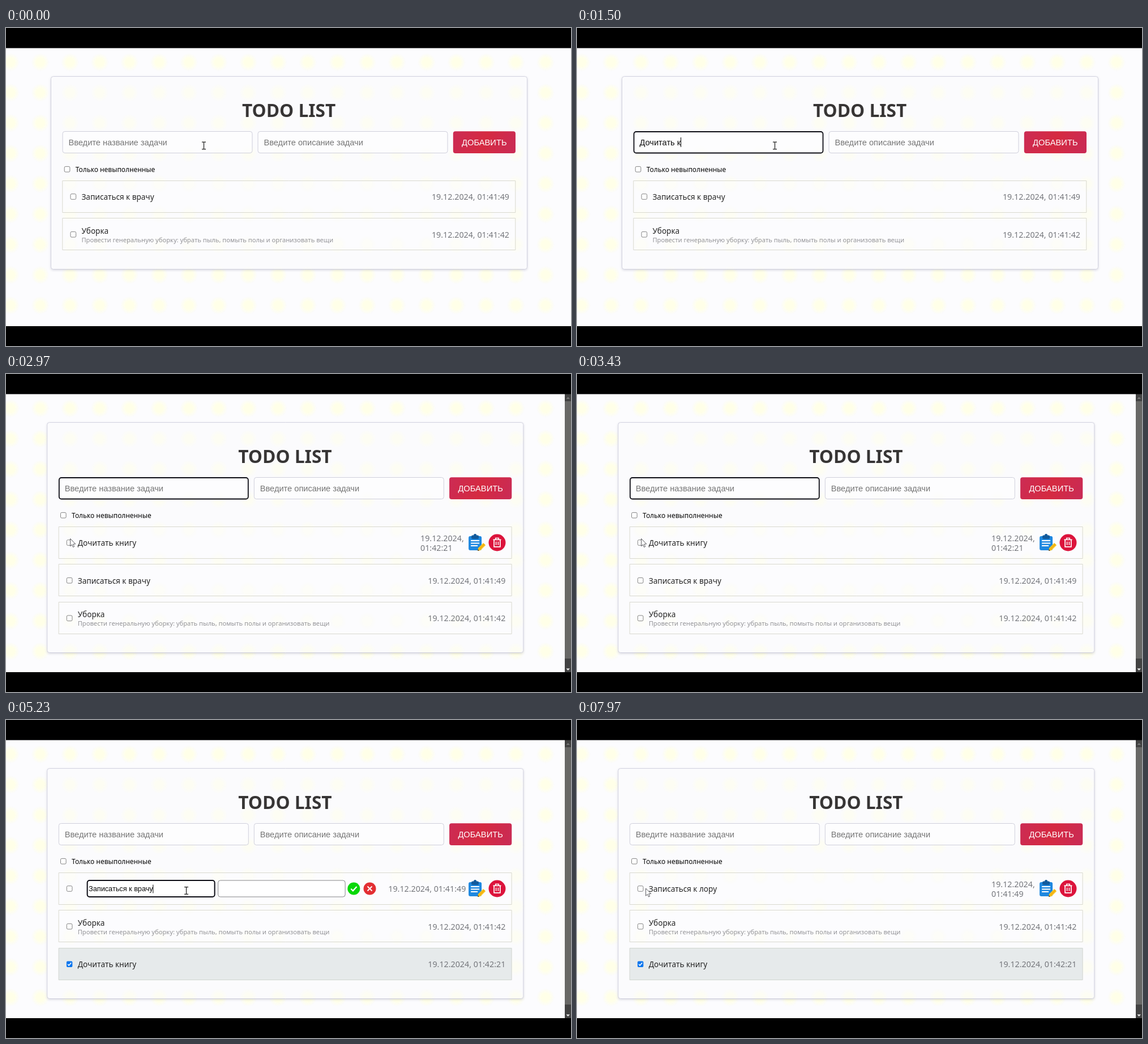
Write an HTML page with a canvas that moves like this. It is 998x561 px and loops after 8000 ms.

```html
<!DOCTYPE html>
<html lang="ru">
<head>
<meta charset="utf-8">
<title>Todo list</title>
<style>
html, body { margin: 0; width: 100%; height: 100%; overflow: hidden; background: #000; }
canvas { display: block; width: 100%; height: 100%; }
</style>
</head>
<body>
<canvas id="stage" width="998" height="561"></canvas>
<script>
const ctx = document.getElementById('stage').getContext('2d');
const LOOP = 8000;
const SANS = '"Noto Sans", sans-serif';
const ARIAL = '"Liberation Sans", Arial, sans-serif';

// Moments of the user's actions, in ms
const FOCUS = 180, SUBMIT = 2500, TICK = 3450, EDIT = 4500, REFOCUS = 5180, SAVE = 7250;
const TYPING = { start: 560, step: 100, text: 'Дочитать книгу' };
const ERASE = { start: 5300, step: 80 };
const RETYPE = { start: 5740, step: 120, text: 'лору' };
const ROWS = [297.5, 364.2, 430.8];

// Pointer legs: start, end, from, to
const LEGS = [
  [2540, 2930, [349.5, 207.5], [113.5, 290.5]],
  [3560, 4270, [113.5, 290.5], [827.5, 298.5]],
  [4640, 5120, [827.5, 298.5], [318.5, 301]],
  [6780, 7130, [318.5, 301], [614, 299]],
  [7340, 7880, [614, 299], [121.5, 297]]
];

const clamp = (v, lo, hi) => Math.max(lo, Math.min(hi, v));
const ease = p => p * p * (3 - 2 * p);

function keysHit(t, k, count) {
  return clamp(Math.floor((t - k.start) / k.step) + 1, 0, count);
}

function pointerAt(t) {
  let pos = LEGS[0][2];
  for (const [from, to, a, b] of LEGS) {
    if (t < from) break;
    const p = ease(clamp((t - from) / (to - from), 0, 1));
    pos = [a[0] + (b[0] - a[0]) * p, a[1] + (b[1] - a[1]) * p];
  }
  return pos;
}

function text(s, x, y, size, color, family = SANS, align = 'left') {
  ctx.font = size + 'px ' + family;
  ctx.fillStyle = color;
  ctx.textAlign = align;
  ctx.fillText(s, x, y);
}

function box(x, y, w, h, r, fill, stroke, line = 1) {
  ctx.beginPath();
  ctx.roundRect(x, y, w, h, r);
  if (fill) { ctx.fillStyle = fill; ctx.fill(); }
  if (stroke) { ctx.strokeStyle = stroke; ctx.lineWidth = line; ctx.stroke(); }
}

function disc(x, y, r, color) {
  ctx.beginPath();
  ctx.arc(x, y, r, 0, Math.PI * 2);
  ctx.fillStyle = color;
  ctx.fill();
}

function path(points, color, width) {
  ctx.beginPath();
  points.forEach(([x, y]) => ctx.lineTo(x, y));
  ctx.strokeStyle = color;
  ctx.lineWidth = width;
  ctx.stroke();
}

function polygon(points, color) {
  ctx.beginPath();
  points.forEach(([x, y]) => ctx.lineTo(x, y));
  ctx.closePath();
  ctx.fillStyle = color;
  ctx.fill();
}

function at(x, y, scale, draw) {
  ctx.save();
  ctx.translate(x, y);
  ctx.scale(scale, scale);
  draw();
  ctx.restore();
}

const dot = document.createElement('canvas');
dot.width = dot.height = 34;
{
  const c = dot.getContext('2d');
  const g = c.createRadialGradient(17, 17, 7, 17, 17, 16);
  g.addColorStop(0, 'rgba(255,255,232,1)');
  g.addColorStop(1, 'rgba(255,255,232,0)');
  c.fillStyle = g;
  c.fillRect(0, 0, 34, 34);
}

function drawPage() {
  ctx.fillStyle = '#fcfcfe';
  ctx.fillRect(0, 0, 998, 561);
  for (let row = 0; row < 9; row++)
    for (let col = 0; col < 19; col++)
      ctx.drawImage(dot, 8 + col * 52.5 - 17, 60.5 + row * 53.6 - 17);
}

function drawBars() {
  ctx.fillStyle = '#000';
  ctx.fillRect(0, 0, 998, 35.5);
  ctx.fillRect(0, 526, 998, 35);
}

function drawScrollbar() {
  ctx.fillStyle = '#424242';
  ctx.fillRect(987, 35, 11, 491);
  ctx.fillStyle = '#686866';
  ctx.fillRect(987, 48, 11, 454);
  polygon([[989.5, 44], [996, 44], [992.7, 40.5]], '#777');
  polygon([[989.5, 519.5], [996, 519.5], [992.7, 523]], '#eee');
}

function drawCard(height) {
  ctx.save();
  ctx.shadowColor = 'rgba(40,40,80,.2)';
  ctx.shadowBlur = 4;
  ctx.shadowOffsetY = 1.5;
  // Shadow only outside the see-through card
  ctx.beginPath();
  ctx.rect(0, 0, 998, 561);
  ctx.roundRect(79.5, 85.5, 841, height, 4);
  ctx.clip('evenodd');
  box(79.5, 85.5, 841, height, 4, '#fcfcfe');
  ctx.restore();
  box(79.5, 85.5, 841, height, 4, 'rgba(252,252,254,.55)', '#d3d3e0');
}

function checkbox(x, y, checked) {
  if (!checked) return box(x - 4.8, y - 4.8, 9.6, 9.6, 2, '#fff', '#767676', 0.9);
  box(x - 5.2, y - 5.2, 10.4, 10.4, 2, '#0b76ee');
  path([[x - 3, y], [x - 1, y + 2.3], [x + 3.1, y - 2.5]], '#fff', 1.5);
}

function caretShown(t, since) {
  return Math.floor((t - since) / 500) % 2 === 0;
}

function caret(x, y, h) {
  ctx.fillStyle = '#000';
  ctx.fillRect(Math.round(x), y, 1, h);
}

function field(x, value, hint, focused) {
  const fill = 'rgba(254,254,255,.7)';
  if (focused) box(x + 0.5, 183, 334, 37.5, 4, fill, '#0c0c14', 1.8);
  else box(x, 182.5, 335, 38, 4, fill, '#cfcfdb');
  text(value || hint, x + 10.5, 207, 14.6, value ? '#111' : '#757575', ARIAL);
}

function drawForm(t) {
  text('TODO LIST', 499.6, 157, 'bold 31.6', '#373535', SANS, 'center');
  const focused = t >= FOCUS && t < TICK;
  const count = keysHit(t, TYPING, TYPING.text.length);
  const value = t < SUBMIT ? TYPING.text.slice(0, count) : '';
  field(100, value, 'Введите название задачи', focused);
  if (focused && t < SUBMIT) {
    const last = count ? TYPING.start + (count - 1) * TYPING.step : FOCUS;
    ctx.font = '14.6px ' + ARIAL;
    if (caretShown(t, last)) caret(110.5 + ctx.measureText(value).width, 193, 17);
  }
  field(445, '', 'Введите описание задачи', false);

  const g = ctx.createLinearGradient(790, 182, 900, 221);
  g.addColorStop(0, '#cc2b54');
  g.addColorStop(0.5, '#d52a41');
  g.addColorStop(1, '#c92b56');
  box(789.8, 182.3, 110.2, 38.7, 4, g);
  text('ДОБАВИТЬ', 844.8, 207, 14.7, '#fff', ARIAL, 'center');

  checkbox(108, 249.2, false);
  text('Только невыполненные', 122.8, 254, 11.9, '#050505');
}

function editIcon(x, y, scale) {
  at(x, y, scale, () => {
    box(-15, -11.5, 23, 25, 3, '#1e88e0');
    box(-10, -13, 13, 6.5, 2, '#125a9c');
    disc(-3.5, -13, 2.6, '#125a9c');
    for (const [ly, w] of [[-3.5, 15], [1, 15], [5.5, 12]]) {
      ctx.fillStyle = '#fff';
      ctx.fillRect(-11, ly - 1, w, 2);
    }
    polygon([[1, 14.5], [2, 9.5], [11, 0.5], [15, 4.5], [6, 13.5]], '#fbc31c');
    path([[4, 11.5], [13, 2.5]], '#eda512', 1.2);
    polygon([[1, 14.5], [1.6, 11.6], [4, 13.9]], '#5a4630');
  });
}

function trashIcon(x, y) {
  at(x, y, 1, () => {
    disc(0, 0, 15, '#dc143c');
    path([[-7, -5.2], [7, -5.2]], '#fff', 1.7);
    path([[-2.8, -5.5], [-2.8, -8], [2.8, -8], [2.8, -5.5]], '#fff', 1.5);
    path([[-5.4, -5], [-5.4, 7.4], [5.4, 7.4], [5.4, -5]], '#fff', 1.7);
    path([[-1.9, -1.8], [-1.9, 4.3]], '#fff', 1.5);
    path([[1.9, -1.8], [1.9, 4.3]], '#fff', 1.5);
  });
}

function drawEditor(t, y) {
  const focused = t >= REFOCUS;
  const erased = keysHit(t, ERASE, 5);
  const typed = keysHit(t, RETYPE, 4);
  const value = 'Записаться к ' + 'врачу'.slice(0, 5 - erased) + RETYPE.text.slice(0, typed);
  box(150.3, y - 14.5, 225, 29, 4, '#fff', focused ? '#0c0c14' : '#858588', focused ? 2 : 1);
  box(381.3, y - 14.5, 224.5, 29, 4, '#fff', '#858588');
  text(value, 152.8, y + 4.6, 12.7, '#080808', ARIAL);
  if (focused) {
    const last = typed ? RETYPE.start + (typed - 1) * RETYPE.step
      : erased ? ERASE.start + (erased - 1) * ERASE.step : REFOCUS;
    if (caretShown(t, last)) caret(152.8 + ctx.measureText(value).width, y - 7, 15);
  }
  disc(621, y, 11, '#08d808');
  path([[616, y + 0.3], [619.6, y + 3.8], [626.2, y - 3.4]], '#fff', 2.2);
  disc(649.2, y, 11, '#e32f33');
  path([[645.2, y - 4], [653.2, y + 4]], '#fff', 1.9);
  path([[653.2, y - 4], [645.2, y + 4]], '#fff', 1.9);
}

function drawTask(task, y, t, hovered, editing, overEdit) {
  const gray = '#75777c';
  const top = Math.round(y - 28) - 0.5;
  box(99.8, top, 800, 56, 0, task.done ? '#e6eaeb' : 'rgba(253,253,255,.35)',
    task.done ? '#d0d6cf' : '#d9d9cf');
  checkbox(118.8, y, task.done);

  if (editing) drawEditor(t, y);
  else {
    text(task.name, 133.4, y + (task.note ? -1.6 : 5.4), 13.5, '#242424');
    if (task.note) text(task.note, 133.4, y + 13.4, 11.15, '#929296');
  }

  const stamp = '19.12.2024, ' + task.time;
  if (editing) text(stamp, 819, y + 5.4, 14.27, gray, SANS, 'right');
  else if (hovered) {
    text('19.12.2024,', 738.7, y - 2.6, 14.27, gray);
    text(task.time, 738.7, y + 14.4, 14.27, gray);
  } else text(stamp, 889, y + 5.4, 14.27, gray, SANS, 'right');

  if (hovered || editing) {
    editIcon(838.8, y, overEdit ? 1.1 : 1);
    trashIcon(874.2, y);
  }
}

function taskList(t) {
  const book = { name: 'Дочитать книгу', time: '01:42:21', done: t >= TICK };
  const doctor = { name: 'Записаться к ' + (t < SAVE ? 'врачу' : 'лору'), time: '01:41:49' };
  const cleaning = {
    name: 'Уборка', time: '01:41:42',
    note: 'Провести генеральную уборку: убрать пыль, помыть полы и организовать вещи'
  };
  if (t < SUBMIT) return [doctor, cleaning];
  return t < TICK ? [book, doctor, cleaning] : [doctor, cleaning, book];
}

function drawPointer(x, y, beam) {
  if (beam) {
    for (const [color, w] of [['rgba(255,255,255,.8)', 3], ['#161616', 1.2]]) {
      path([[x, y - 6], [x, y + 6]], color, w);
      path([[x - 3.5, y - 6.3], [x + 3.5, y - 6.3]], color, w);
      path([[x - 3.5, y + 6.3], [x + 3.5, y + 6.3]], color, w);
    }
    return;
  }
  const shape = [[0, 0], [0, 13.2], [3, 10.4], [5, 15], [7.1, 14], [5.2, 9.6], [9.2, 9.4], [0, 0]];
  at(x, y, 1, () => {
    polygon(shape, '#fff');
    path(shape, '#4a4a50', 0.9);
  });
}

function draw(t) {
  const scrolled = t >= SUBMIT;
  const shift = scrolled ? -6.7 : 0;
  const [px, py] = pointerAt(t);
  const editing = t >= EDIT && t < SAVE;
  const inside = (x, y, w, h) => px >= x && px <= x + w && py >= y && py <= y + h;

  drawPage();
  ctx.save();
  ctx.translate(shift, 0);
  drawCard(scrolled ? 406 : 340);
  drawForm(t);
  taskList(t).forEach((task, i) => {
    const y = ROWS[i];
    const hovered = inside(93, y - 28, 800, 56);
    const overEdit = hovered && inside(816, y - 15, 32, 30);
    drawTask(task, y, t, hovered, editing && i === 0, overEdit);
  });
  ctx.restore();

  if (scrolled) drawScrollbar();
  drawBars();
  const beam = inside(100 + shift, 183, 335, 38) || inside(445 + shift, 183, 335, 38)
    || editing && (inside(143, 283, 226, 30) || inside(374, 283, 225, 30));
  drawPointer(px, py, beam);
}

const began = performance.now();
function frame() {
  draw((performance.now() - began) % LOOP);
  requestAnimationFrame(frame);
}
frame();
</script>
</body>
</html>
```
